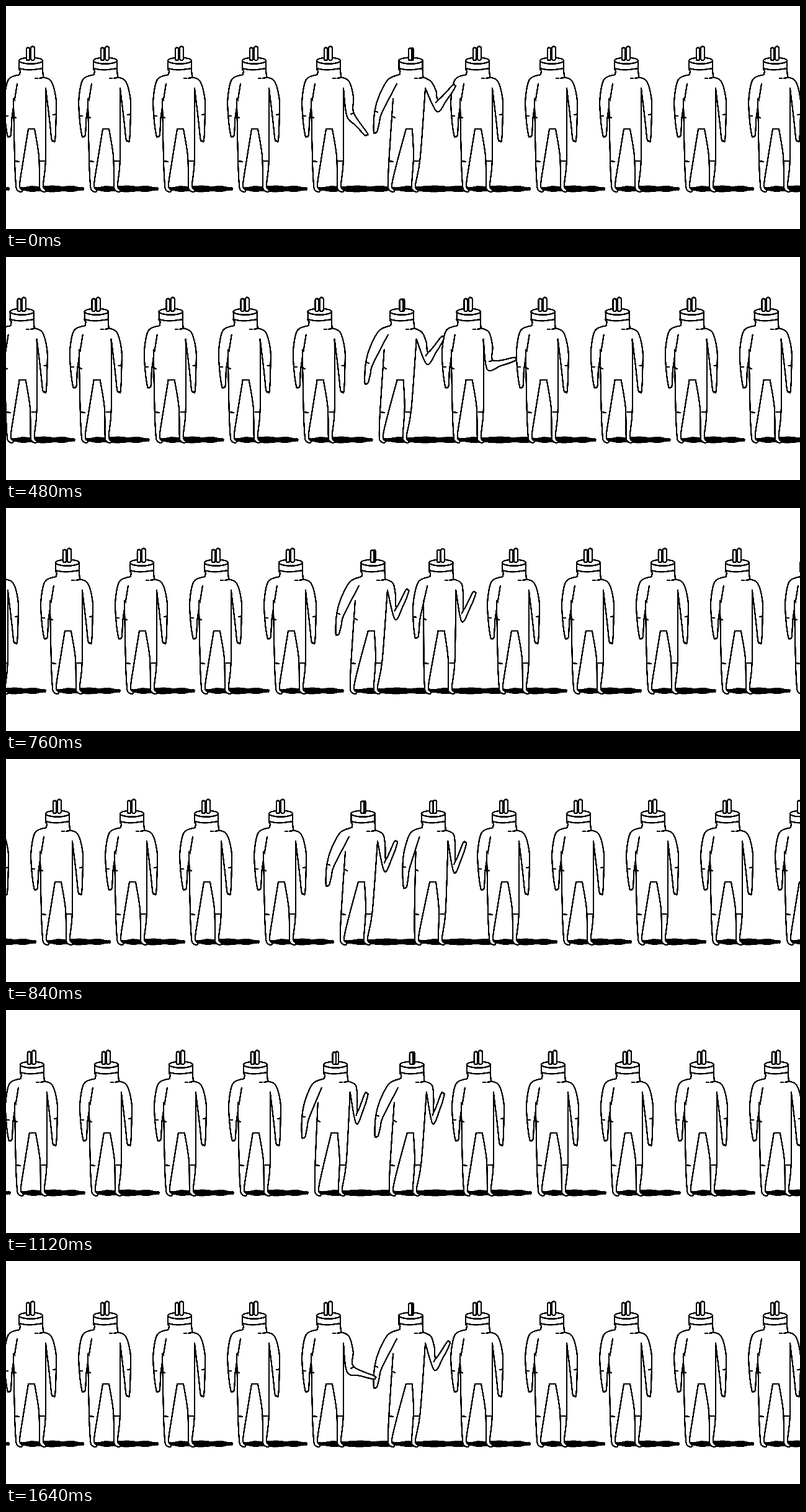
Recreate the animation shown at these times as an HTML page with a canvas. Size 1280 px wide and 361 px high, loop 1720 ms.

```html
<!DOCTYPE html>
<html lang="en">
<head>
<meta charset="utf-8">
<title>Shoulder tap queue</title>
<style>
html, body { margin: 0; width: 100%; height: 100%; overflow: hidden; background: #fff; }
canvas { display: block; filter: contrast(6); }
</style>
</head>
<body>
<canvas id="stage" width="1280" height="361"></canvas>
<script>
const ctx = document.getElementById('stage').getContext('2d');
const LOOP = 1720, GAP = 120, FLOOR = 300;

const ramp = (t, from, to) => Math.max(0, Math.min(1, (t - from) / (to - from)));
const smooth = p => p * p * (3 - 2 * p);
const mid = (a, b) => [(a[0] + b[0]) / 2, (a[1] + b[1]) / 2];
const move = (p, dir, d) => [p[0] + dir[0] * d, p[1] + dir[1] * d];
const unit = (x, y) => { const l = Math.hypot(x, y); return [x / l, y / l]; };

// Smooth curve through all points.
function trace(pts) {
  const at = i => pts[Math.max(0, Math.min(pts.length - 1, i))];
  ctx.beginPath();
  ctx.moveTo(...pts[0]);
  for (let i = 0; i < pts.length - 1; i++) {
    const [a, b, c, d] = [at(i - 1), at(i), at(i + 1), at(i + 2)];
    ctx.bezierCurveTo(b[0] + (c[0] - a[0]) / 6, b[1] + (c[1] - a[1]) / 6,
      c[0] - (d[0] - b[0]) / 6, c[1] - (d[1] - b[1]) / 6, ...c);
  }
}

function ink() {
  ctx.fillStyle = '#fff';
  ctx.fill();
  ctx.stroke();
}

function line(...pts) {
  ctx.beginPath();
  for (const p of pts) ctx.lineTo(...p);
  ctx.stroke();
}

// State of one figure, counted from the moment it is about to be tapped.
function poseAt(t) {
  const raise = 1 - (1 - ramp(t, 240, 940)) ** 2.5;
  const drop = ramp(t, 2880, 3520) ** 2;
  return {
    turn: smooth(ramp(t, 640, 1060)) - smooth(ramp(t, 2720, 3080)),
    lift: raise - drop,
    reach: ramp(t, 1280, 1720) ** 3 - smooth(ramp(t, 1960, 2760))
  };
}

function drawShadow({ lift }) {
  const radius = 52 + 16 * Math.min(1, lift * 3), pts = [];
  for (let a = 0; a < 6.4; a += .2) {
    const s = Math.sin(a);
    pts.push([radius - 18 + radius * Math.cos(a),
      296 + 5 * Math.sign(s) * Math.abs(s) ** .6 + .6 * Math.sin(a * 9)]);
  }
  trace(pts);
  ctx.fillStyle = '#000';
  ctx.fill();
}

// side is -1 for the left arm and 1 for the right one.
function drawArm(side, neck, shoulder, armpit, elbow, hand) {
  const top = mid(shoulder, armpit);
  const upper = unit(elbow[0] - top[0], elbow[1] - top[1]);
  const fore = unit(hand[0] - elbow[0], hand[1] - elbow[1]);
  const out = unit(side * (upper[1] + fore[1]), -side * (upper[0] + fore[0]));
  const straight = Math.hypot(upper[0] + fore[0], upper[1] + fore[1]) / 2;
  const across = [side * fore[1], -side * fore[0]];
  const width = 5.8 / Math.max(straight, .58);
  const outer = move(elbow, out, width), inner = move(elbow, out, -width);
  const tip = move(hand, across, -2.8);
  trace([neck, shoulder, move(mid(shoulder, outer), [side, 0], 3.5 * straight), outer,
    move(hand, across, 2.8), move(hand, fore, 2.5), tip,
    move(mid(inner, tip), across, -3 * (1 - straight)), inner, armpit]);
  ink();
  if (straight < .8) line(outer, move(outer, fore, -7));
  else line(outer, move(outer, out, -5));
}

function drawLeg(leftTop, leftKnee, ankle, rightKnee, rightTop) {
  trace([leftTop, leftKnee, [ankle - 3, 290], [ankle - 1, FLOOR - 2], [ankle + 5, FLOOR + 1],
    [ankle + 7, FLOOR - 2], [ankle + 3, 290], rightKnee, rightTop]);
  ink();
}

function drawProng(x, top, halfWidth) {
  ctx.beginPath();
  ctx.roundRect(x - halfWidth, top, 2 * halfWidth, 88 - top, halfWidth);
  ink();
}

function drawHead(turn) {
  ctx.save();
  ctx.translate(12.5 * turn, 0);
  line([-19, 88], [-19, 103], [-17, 105], [-18, 111]);
  line([19, 88], [19, 103], [20, 115]);
  ctx.beginPath();
  ctx.ellipse(0, 88.5, 19, 5, 0, 0, 7);
  ctx.stroke();
  trace([[-19, 101], [-9, 103], [5, 103], [19, 101]]);
  ctx.stroke();
  drawProng(3 - turn, 65.5 + 2.5 * turn, 3.2 - turn);
  drawProng(-4.5 + 3.5 * turn, 67.5 + turn, 2.7);
  ctx.restore();
}

function drawFigure({ turn, lift, reach }) {
  // Turning leans the body to the side, while the feet stay.
  const at = (x, y) => [x + 12 * turn * ramp(y, FLOOR, 175) ** 1.4, y];
  const crotch = [at(-4, 199), at(6, 199)];
  const armpit = at(24, 133);

  drawArm(-1, at(-18, 111), at(-36, 119), at(-22, 126),
    at(-36 - 16 * turn, 178 - 6 * turn), at(-35 - 18 * turn, 209 - 6 * turn));
  drawLeg(at(-28, 150), at(-26, 250), -21, at(-13, 255), crotch[0]);
  drawLeg(crotch[1], at(13, 243), 17, at(24, 247), armpit);
  line(...crotch);

  const angle = (88 - 156 * lift + 18 * reach) * Math.PI / 180;
  const elbow = move(at(35, 176 - 2 * lift), [9, -13], reach);
  drawArm(1, at(20, 115), at(33, 122), armpit, elbow,
    move(elbow, [Math.cos(angle), Math.sin(angle)], 40));
  drawHead(turn);

  const tick = (x, y, dx, dy) => line(at(x, y), at(x + dx, y + dy));
  tick(7, 117, 4, 0);
  tick(14, 117, 5, -1);
  tick(-25, 251, 6, 1);
  tick(16, 251, 6, 0);
  tick(-28, 179, 4, 2);
}

function render(now) {
  // Steps of 40 ms, slower near the end of the loop.
  let t = now % LOOP;
  t = t < 1280 ? Math.floor(t / 40) * 40 : 1280 + Math.floor((t - 1280) / 120) * 120;
  const shift = GAP * smooth(ramp(t, 210, 1180) ** 1.2);
  ctx.fillStyle = '#fff';
  ctx.fillRect(0, 0, 1280, 361);
  ctx.lineWidth = 2.3;
  ctx.lineJoin = ctx.lineCap = 'round';
  for (const draw of [drawShadow, drawFigure]) {
    for (let k = 12; k >= -1; k--) {
      ctx.save();
      ctx.translate(40 + GAP * k - shift, 0);
      draw(poseAt(t + (6 - k) * LOOP));
      ctx.restore();
    }
  }
}

const start = performance.now();
function loop() {
  render(performance.now() - start);
  requestAnimationFrame(loop);
}
loop();
</script>
</body>
</html>
```
